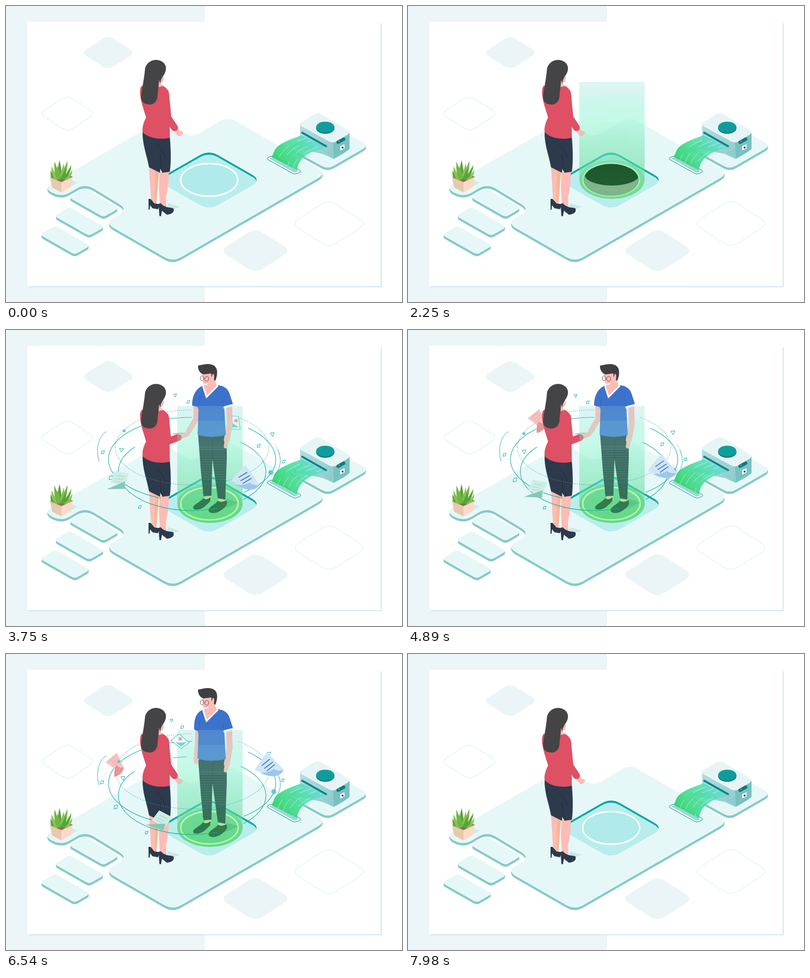
An HTML page with a canvas for the animation above (8 s loop, 800 px wide and 600 px high).

```html
<!DOCTYPE html>
<html lang="en">
<head>
<meta charset="utf-8">
<title>Isometric hologram meeting</title>
<style>
html, body { margin: 0; width: 100%; height: 100%; overflow: hidden; background: #fff; }
canvas { display: block; width: 800px; height: 600px; }
</style>
</head>
<body>
<canvas id="stage" width="800" height="600"></canvas>
<script>
const ctx = document.getElementById('stage').getContext('2d');
const LOOP = 8000, DEG = Math.PI / 180;
const SIDE = '#84cac8', TOP = '#e6f7f7', TEAL = '#14aaaa', SKIN = '#fdbcb5', NAVY = '#2c3a4b';

// ---- helpers ----
const mix = (a, b, k) => a + (b - a) * k;
const mixPoint = (p, q, k) => [mix(p[0], q[0], k), mix(p[1], q[1], k)];
function ramp(t, from, to) {
  const k = Math.min(1, Math.max(0, (t - from) / (to - from)));
  return k * k * (3 - 2 * k);
}
const span = (t, a, b, c, d) => ramp(t, a, b) - ramp(t, c, d);

function fill(path, color) {
  ctx.fillStyle = color;
  ctx.fill(typeof path === 'string' ? new Path2D(path) : path);
}
function line(path, color, width = 1) {
  ctx.strokeStyle = color;
  ctx.lineWidth = width;
  ctx.stroke(typeof path === 'string' ? new Path2D(path) : path);
}
function oval(x, y, rx, ry = rx) {
  const p = new Path2D();
  p.ellipse(x, y, Math.max(0, rx), Math.max(0, ry), 0, 0, 7);
  return p;
}
function gradient(x0, y0, x1, y1, ...colors) {
  const g = ctx.createLinearGradient(x0, y0, x1, y1);
  colors.forEach((c, i) => g.addColorStop(i / (colors.length - 1), c));
  return g;
}
function group(draw, alpha = 1, x = 0, y = 0, turn = 0) {
  if (alpha <= 0) return;
  ctx.save();
  ctx.globalAlpha *= alpha;
  ctx.translate(x, y);
  ctx.rotate(turn * DEG);
  draw();
  ctx.restore();
}
function rounded(points, r) {
  const p = new Path2D(), n = points.length;
  points.forEach((c, i) => {
    const toward = q => mixPoint(c, q, Math.min(.5, r / Math.hypot(q[0] - c[0], q[1] - c[1])));
    const a = toward(points[(i + n - 1) % n]), b = toward(points[(i + 1) % n]);
    p[i ? 'lineTo' : 'moveTo'](...a);
    p.quadraticCurveTo(...c, ...b);
  });
  p.closePath();
  return p;
}
const diamond = (x, y, w, h, r) =>
  rounded([[x, y - h], [x + w, y], [x, y + h], [x - w, y]], r);
function slab(path, color = TOP, depth = 5) {
  for (let d = depth; d > 0; d--) group(() => fill(path, SIDE), 1, 0, d);
  fill(path, color);
}

// ---- still scenery ----
const floor = rounded([[75, 369], [318, 229], [374, 268], [448, 224], [648, 339], [337, 519],
  [200, 440], [246, 412], [160, 360], [112, 388]], 20);
const step = rounded([[157, 369], [228, 410], [197, 428], [127, 388]], 7);
const printerBase = rounded([[565, 284], [648, 236], [733, 283], [650, 331]], 14);
const pad = diamond(410, 352.5, 106, 61, 22);

function drawBackdrop() {
  fill('M0,0H800V600H0Z', '#fff');
  fill('M0,0H402V600H0Z', '#ecf5f7');
  fill('M45,35H759V570H45Z', '#cfe9ec');
  fill('M43,32H757V568H43Z', '#fff');
  fill(diamond(206.5, 94.5, 55, 35, 14), '#ebf5f7');
  fill(diamond(504, 496, 72, 46, 18), '#ebf5f7');
  line(diamond(124, 218, 57, 37, 14), '#dff2f2', 1.3);
  line(diamond(652.5, 441, 76, 49, 18), '#dff2f2', 1.3);
  slab(floor);
  for (let i = 0; i < 3; i++) group(() => slab(step), 1, -29 * i, 38 * i);
  slab(printerBase);
}

function drawPad() {
  ctx.save();
  ctx.clip(pad);
  fill(pad, '#05a8a2');
  group(() => fill(pad, '#b9eded'), 1, 0, 4.5);
  ctx.restore();
  const ring = oval(410.5, 352.5, 57.5, 33);
  fill(ring, '#b0eaea');
  line(ring, '#fff', 3);
}

function drawPlant() {
  fill('M118,372L145,358L130,352Z', '#cfebea');
  fill('M89,347L112,338L135,346L112,357Z', '#8a6a4a');
  const tips = [[90, 333], [92, 325], [98, 315], [108, 312], [117, 319], [124, 314], [132, 322], [134, 331], [104, 324], [121, 328]];
  tips.forEach(([x, y], i) => {
    const base = 101 + i * 2.4 - (i > 7 ? 12 : 0), bend = mix(base, x, .65);
    fill(`M${base - 3},352Q${bend - 5},${y + 20} ${x},${y}Q${bend + 5},${y + 18} ${base + 4},352Z`,
      ['#56a53a', '#8cc152', '#71b644'][i % 3]);
  });
  fill('M89,347L112,357V378L93,368Z', '#e6caae');
  fill('M112,357L135,346L131,367L112,378Z', '#fadbc8');
  line('M89,347L112,357L135,346', '#c9a88c', 1.2);
}

function drawPrinter(t) {
  fill('M573,286L596,272L664,311L640,300Z', '#9bd0d0');
  fill('M594,238L660,274L662,310L594,271Z', gradient(594, 240, 662, 300, '#b4dfe1', '#8fcccd'));
  fill('M660,274L694,256V289Q693,293 662,310Z', '#79c1c1');
  fill(rounded([[590, 240], [630, 215], [698, 256], [661, 279]], 10), '#e7f4f6');
  line('M597,256L648,285', '#0b848a', 4);
  fill(oval(645, 248, 18.5, 11), '#087e82');
  fill(oval(645, 245.5, 18.5, 11), '#109c9c');
  ctx.lineCap = 'round';
  line('M671,276L682,270', '#0b7b80', 7);
  fill(oval(673, 274, 1.5), '#ef6a6a');
  ctx.lineCap = 'butt';
  fill('M675,284L684,280V289L675,293Z', '#f4fafa');
  fill(oval(680, 287, 2), '#444');

  fill(rounded([[523, 309], [538, 301], [600, 335], [584, 344]], 6), '#e9fafa');
  line(rounded([[525, 309], [538, 303], [598, 335], [584, 342]], 6), '#2a9ea6', 1.2);
  fill('M532,309L540,305L591,334L583,338Z', '#9fd5d6');
  const sheet = new Path2D('M597,262C570,272 548,280 542,294L537,306L588,333C590,308 615,292 648,287Z');
  fill(sheet, gradient(630, 265, 548, 318, 'rgba(95,222,212,.8)', 'rgba(75,222,160,.9)', 'rgba(50,211,107,.95)'));
  ctx.save();
  ctx.clip(sheet);
  const sweep = -(t / 30) % 50;
  for (let i = 1; i < 5; i++) {
    const x = i * 10, y = i * 5.3;
    ctx.setLineDash([30, 20]);
    ctx.lineDashOffset = sweep + i * 11;
    line(`M${597 + x},${262 + y}C${570 + x},${272 + y} ${548 + x},${280 + y} ${539 + x},${309 + y}`, 'rgba(255,255,255,.55)', 1);
  }
  ctx.restore();
}

// ---- people ----
function limb(points, color, width) {
  ctx.lineCap = ctx.lineJoin = 'round';
  line('M' + points.map(p => p.join()).join('L'), color, width);
  ctx.lineCap = 'butt';
  ctx.lineJoin = 'miter';
}

function drawWoman(raise, shake) {
  fill('M318,418L352,407L328,400Z', '#cbe8e8');
  fill('M289,326L293,393L303,401L304,380L309,334Z', SKIN);
  fill('M301,334L300,398L304,400L309,336Z', '#f4b796');
  fill('M310,336L309,370L311,402L324,410L323,388C328,370 329,350 329,336Z', SKIN);
  fill('M288,391L292,391L300,400L311,402L307,412L296,410L291,404L290,413H288Z', NAVY);
  fill('M308,401L313,400C320,409 330,408 338,410C341,417 336,422 325,423L315,415L313,426H310Z', NAVY);
  fill('M276,254C290,268 315,270 331,266C333,290 334,315 331,336L316,338L312,330L311,338L289,327C284,300 275,280 276,254Z', NAVY);
  line('M304,280Q316,290 322,308M311,300L314,334', '#1f2b39', 1);
  const pose = (rest, up, out) => mixPoint(mixPoint(rest, up, raise), out, shake);
  const elbow = pose([326, 225], [343, 202], [326, 226]);
  const wrist = pose([342, 249], [361, 177], [350, 217]);
  const palm = pose([350, 259], [368, 167], [363, 212]);
  limb([wrist, palm], SKIN, 10);
  if (shake < .5 && raise < .5) limb([palm, [palm[0] + 4, palm[1] - 2]], SKIN, 7);
  fill('M274,162C269,168 270,180 275,200L283,226C277,238 275,246 276,256C290,270 315,271 331,267L330,185C330,173 325,165 315,161Z', '#de5063');
  limb([[321, 176], elbow], '#de5063', 16);
  limb([elbow, mixPoint(elbow, wrist, .9)], '#de5063', 14);
  fill('M305,152L316,134L319,146L317,154L311,157L318,162L306,165Z', SKIN);
  fill('M281,126C286,110 303,106 314,112C325,118 325,129 320,138C314,147 312,150 312,158L309,150C309,165 306,175 306,183C305,196 296,202 284,199C276,197 272,192 273,181C274,170 279,150 281,126Z', '#444446');
}

function drawMan(shake) {
  fill('M436,364L470,350L446,342Z', 'rgba(30,110,70,.25)');
  fill('M402,334H415V345L400,348ZM429,342H444V350L428,353Z', '#d9e29a');
  fill('M378,361C378,353 392,350 398,341Q404,346 413,339C415,347 410,350 400,359C392,365 380,366 378,361Z', '#1d4a35');
  fill('M409,365C410,358 424,353 428,346Q436,351 445,345C449,352 445,358 435,365C425,373 410,373 409,365Z', '#1d4a35');
  fill('M388,211C405,219 428,217 446,211L446,260L443,344L428,341L417,262L415,336L399,337L394,290Z', '#253f45');
  line('M417,222V262M397,330L415,331M429,335L443,338', '#182e33', 1);
  const elbow = mixPoint([387, 185], [384, 180], shake);
  const hand = mixPoint([384, 219], [366, 211], shake);
  limb([[451, 158], [452, 190], [446, 223]], SKIN, 12);
  limb([[446, 222], [444, 236]], SKIN, 8);
  const edge = mix(380, 376, shake);
  limb([[mix(388, 384, shake), 150], elbow, mixPoint(elbow, hand, .8)], SKIN, 11);
  limb([mixPoint(elbow, hand, .7), hand], SKIN, 9);
  fill(`M397,113L405,138L428,112C440,113 448,118 452,130L459,152L441,157L444,213C425,218 402,217 387,212L389,157L${edge},153C${edge},135 382,120 397,113Z`, '#3d72cc');
  line('M439,157L459,152', '#fff', 4);
  line('M388,160Q389,143 393,133M440,157L438,140', '#3262b5', 1);
  fill('M401,108L422,102L426,114L406,134L399,119Z', SKIN);
  line('M398,114L405,136L428,113', '#fff', 3);
  fill('M396,86L398,106C400,114 406,117 412,116L421,108L424,95L418,82Z', SKIN);
  fill('M388,72C395,72 405,66 418,71C429,76 428,90 423,103L420,101Q422,88 418,89L415,96V88L399,90C392,88 387,80 388,72Z', '#3f3f41');
  line(oval(396, 98, 3.5, 5), '#555');
  line(oval(405.5, 99, 4, 5), '#555');
  line('M400,109Q404,112 408,108', '#fff', 2);
}

// ---- hologram ----
const beamPath = top => new Path2D(`M346,${top}H478V352A66,39 0 0 1 346,352Z`);

function drawBeamBack(top, glow, disc) {
  group(() => {
    fill(beamPath(top), gradient(0, 154, 0, 391, 'rgba(190,236,236,.25)', 'rgba(180,255,225,.5)', 'rgba(120,230,190,.35)', 'rgba(90,215,110,.4)'));
    fill(oval(412, 352, 66, 39), 'rgba(80,210,110,.35)');
  }, glow);
  group(() => {
    fill(oval(412, 352, 66, 39), 'rgba(80,205,110,.35)');
    line(oval(411, 352, 58, 33), '#e6ffc4', 3);
  }, disc * glow);
}

function drawHole(open, lift) {
  if (open <= 0) return;
  const rx = 55 * open, ry = 32 * open;
  group(() => {
    fill(oval(410.5, 352, rx, ry), '#00200a');
    if (lift > 0) {
      ctx.clip(oval(410.5, 352, rx, ry));
      fill(oval(410.5, 352, rx, ry), '#94a294');
      fill(oval(412, 342 - 40 * Math.max(0, lift - 1), rx, 22), '#001c02');
      line('M374,371H388M400,373H424M434,370H446', '#a8b46a', 1.5);
    }
  });
  line(oval(410.5, 352, rx + 2, ry + 1.5), 'rgba(220,250,225,.6)', 3 * open);
}

function drawBeamFront(top, glow, t) {
  group(() => {
    fill(beamPath(top), gradient(0, 154, 0, 391, 'rgba(150,222,220,.2)', 'rgba(140,235,205,.26)', 'rgba(100,220,150,.3)', 'rgba(85,215,115,.36)'));
    const shift = (t / 60) % 5;
    for (let y = 235 + shift; y < 305; y += 5) if (y > top) line(`M388,${y}H446`, 'rgba(150,230,180,.13)', 1.5);
    for (let y = 154; y < 215; y += 30) if (y > top) fill(`M346,${y}H478V${y + 30}H346Z`, `rgba(170,240,220,${y === 184 ? .1 : .05})`);
  }, glow);
}

const ORBITS = [
  { c: [376, 262], r: [169, 85], back: [[-180, -90], [-48, 0]], front: [[0, 52], [112, 180]] },
  { c: [376, 287], r: [149, 79], back: [[-180, -141], [-105, -94], [-49, 0]], front: [[0, 46], [70, 180]] },
  { c: [376, 238], r: [155, 76], dots: true, back: [[-180, -90], [-53, 0]], front: [[0, 180]] }
];
function drawOrbits(layer, grow) {
  for (const o of ORBITS) for (const [a, b] of o[layer]) {
    const p = new Path2D();
    p.ellipse(...o.c, ...o.r, 0, a * DEG, mix(a, b, grow) * DEG);
    ctx.setLineDash(o.dots ? [1.5, 2.5] : []);
    line(p, TEAL, 1.1);
  }
  ctx.setLineDash([]);
}
function drawSideArcs() {
  line('M203,206C188,215 180,240 188,266', TEAL, .9);
  line('M549,243C558,262 555,280 542,295', TEAL, .9);
  ctx.setLineDash([1.5, 2.5]);
  line('M543,232Q550,240 552,252', TEAL, 1);
  ctx.setLineDash([]);
}

const TIMES = [2880, 3750, 4890, 6540];
function along(keys, t) {
  const i = t < TIMES[1] ? 0 : t < TIMES[2] ? 1 : 2;
  const k = (t - TIMES[i]) / (TIMES[i + 1] - TIMES[i]);
  return keys[i].map((v, n) => mix(v, keys[i + 1][n], k));
}

const CARDS = {
  pink: {
    keys: [[335, 163, 6], [298, 171, 3], [260, 185, 0], [219, 225, 0]],
    draw() {
      fill('M-18,-6L5,-25L19,5Q17,20 0,24L2,9Z', '#f6c3c3');
      fill('M0,24Q-1,8 4,0Q10,7 19,5Q17,18 0,24Z', '#e79494');
      line('M-10,-7L3,-18M-6,-3L7,-13M-2,1L10,-8', '#efaaaa', 1.2);
    }
  },
  photo: {
    keys: [[489, 195, 52], [462, 187, 40], [415, 180, 18], [352, 176, 0]],
    draw() {
      fill('M-19,-1L-2,-14L18,4L2,16Z', '#f8fdfd');
      line('M-19,-1L-2,-14L18,4L2,16Z', '#62bcbc', 1.2);
      fill('M-10,2Q2,6 13,2L2,12Z', '#5dd3cf');
      fill(oval(0, -4, 3.5), '#ef9a90');
    }
  },
  blue: {
    keys: [[457, 309, 17], [484, 298, 8], [514, 275, 4], [531, 223, 0]],
    draw() {
      fill('M-29,12L-4,-24Q12,-8 30,12Q25,23 10,25Q-10,20 -29,12Z', '#d0e5f7');
      fill('M-18,18Q0,18 10,10Q20,16 30,12Q25,23 10,25Q-6,24 -18,18Z', '#9fc6ea');
      line('M-14,3L2,-10M-9,9L8,-4M-4,14L12,1', '#3c7ec2', 1.8);
    }
  },
  teal: {
    keys: [[208, 283, -8], [226, 305, -4], [258, 322, 0], [310, 337, 16]],
    draw() {
      fill('M-15,4L-6,-19L23,-13L14,12Z', '#cdeee5');
      line('M-2,-10L14,-7M-5,-4L11,-1M-7,1L8,4', '#9fd8c8', 1.2);
      fill('M-24,16L14,3L13,18Z', '#83c9ba');
    }
  }
};
function drawCard(name, t, alpha) {
  const [x, y, turn] = along(CARDS[name].keys, t);
  group(CARDS[name].draw, alpha, x, y, turn);
}

// Each drifts from its first point to its second.
const BITS = [
  ['tri', 344, 132, 334, 135, 3], ['par', 372, 145, 356, 148, 3],
  ['tri', 540, 215, 531, 203, 4], ['par', 508, 237, 518, 227, 3.2],
  ['par', 562, 270, 559, 256, 3], ['par', 196, 244, 194, 260, 3.2],
  ['tri', 232, 241, 236, 252, 4], ['par', 209, 296, 222, 310, 4],
  ['par', 266, 358, 284, 362, 3], ['dot', 242, 200, 228, 218, 3],
  ['dot', 533, 292, 541, 279, 5]
];
function drawBits(t) {
  const k = (t - TIMES[0]) / (TIMES[3] - TIMES[0]);
  for (const [kind, x0, y0, x1, y1, r] of BITS) group(() => {
    if (kind === 'dot') fill(oval(0, 0, r), '#6cc7c5');
    else line(kind === 'tri'
      ? `M${-r},${-r * .8}L${r},${-r}L${r * .2},${r}Z`
      : `M${-r * .6},${-r * .8}L${r},${-r}L${r * .6},${r * .8}L${-r},${r}Z`, TEAL, 1);
  }, 1, mix(x0, x1, k), mix(y0, y1, k));
}

function draw(t) {
  const raise = span(t, 60, 600, 900, 1450);
  const shake = span(t, 3250, 3650, 5200, 5650);
  const open = span(t, 900, 1550, 2500, 2900) + span(t, 6750, 7050, 7500, 8000);
  const lift = t < 4000 ? ramp(t, 1650, 2200) + ramp(t, 2250, 2600) : 0;
  const glow = span(t, 1650, 1950, 7450, 7850);
  const top = mix(345, 154, span(t, 1680, 2180, 7400, 7800));
  const disc = span(t, 2450, 2900, 6750, 7050);
  const sink = 305 * (1 - span(t, 2330, 2910, 7020, 7550));
  const orbit = span(t, 2450, 2820, 7000, 7450);
  const cards = span(t, 2500, 3150, 6900, 7350);

  drawBackdrop();
  drawPad();
  drawPrinter(t);
  drawPlant();
  drawBeamBack(top, glow, disc);
  drawHole(open, lift);
  group(() => {
    drawOrbits('back', t < 4000 ? orbit : 1);
    drawCard('pink', t, cards);
    drawCard('photo', t, cards);
  }, orbit);
  if (sink < 300) {
    ctx.save();
    ctx.clip(new Path2D('M340,0H480V352H468.5A58,33 0 0 1 352.5,352H340Z'));
    group(() => drawMan(shake), 1, 0, sink);
    ctx.restore();
  }
  drawWoman(raise, shake);
  drawBeamFront(top, glow, t);
  group(() => {
    drawOrbits('front', t < 4000 ? orbit : 1);
    drawSideArcs();
    drawBits(t);
    drawCard('teal', t, cards);
    drawCard('blue', t, cards);
  }, orbit);
}

const start = performance.now();
function frame() {
  draw((performance.now() - start) % LOOP);
  requestAnimationFrame(frame);
}
frame();
</script>
</body>
</html>
```
